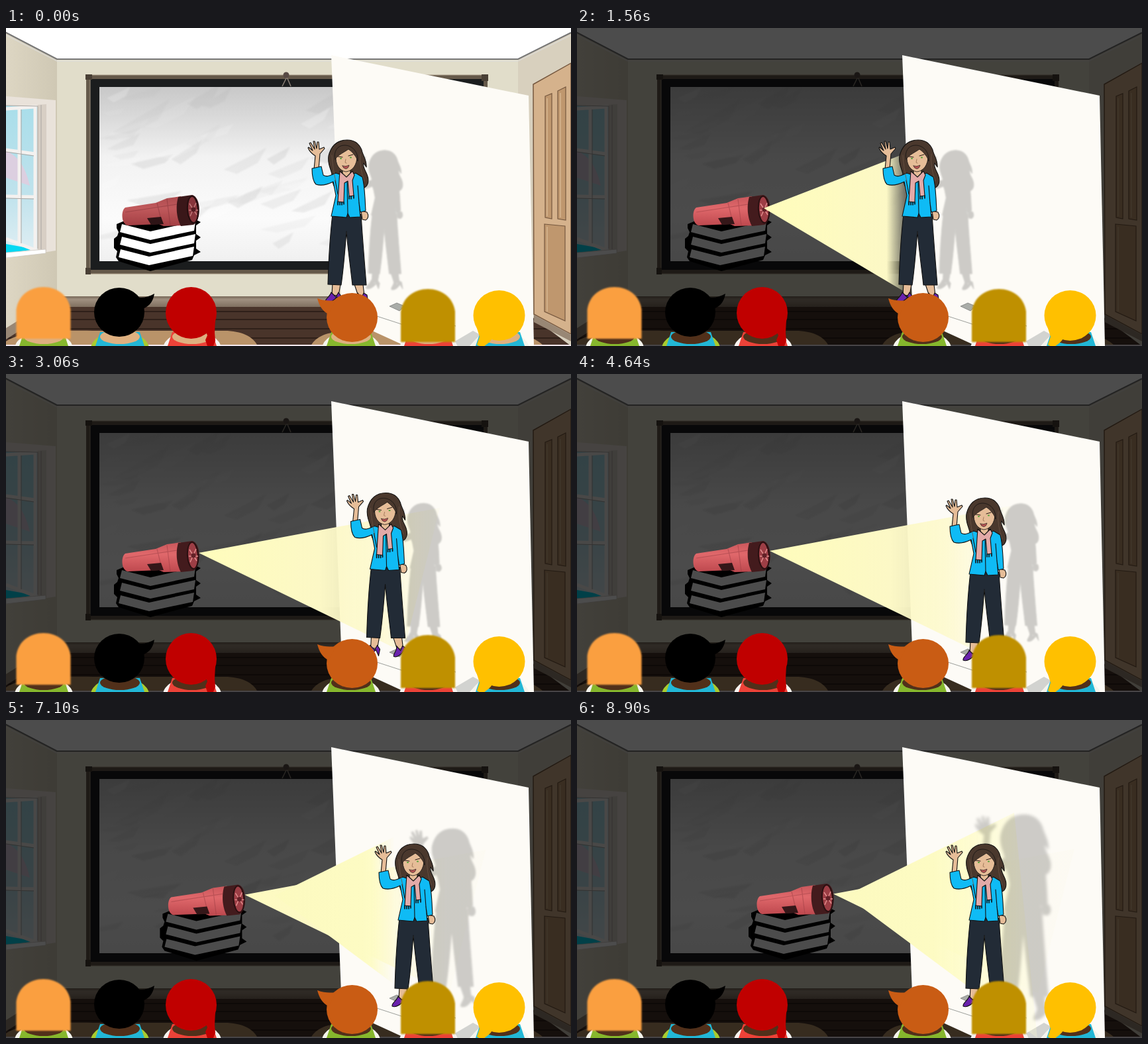
An HTML page for the animation above (9030 ms loop, 853 px wide and 480 px high).

```html
<!DOCTYPE html>
<html lang="en">
<head>
<meta charset="utf-8">
<title>Light and shadow</title>
<style>
  html, body { margin: 0; width: 100%; height: 100%; overflow: hidden; background: #fff; }
  svg { display: block; width: 100vw; height: 100vh; }
  .soft { filter: blur(1.3px); }
</style>
</head>
<body>
<svg viewBox="0 0 853 480" preserveAspectRatio="none">
  <defs>
    <linearGradient id="paper" x2="0" y2="1">
      <stop offset="0" stop-color="#c8c8c8"/><stop offset=".18" stop-color="#dadada"/>
      <stop offset=".4" stop-color="#f2f2f2"/><stop offset=".75" stop-color="#fbfbfb"/><stop offset="1" stop-color="#f0f0f0"/>
    </linearGradient>
    <linearGradient id="sky" x2="0" y2="1"><stop offset="0" stop-color="#a9deea"/><stop offset=".6" stop-color="#bfe2ec"/><stop offset="1" stop-color="#dfeef3"/></linearGradient>
    <linearGradient id="sideWall"><stop offset="0" stop-color="#ddd6c3"/><stop offset="1" stop-color="#cfc8b4"/></linearGradient>
    <linearGradient id="skirting" x2="0" y2="1"><stop offset="0" stop-color="#776858"/><stop offset=".3" stop-color="#a09080"/><stop offset="1" stop-color="#807060"/></linearGradient>
    <linearGradient id="torch" x2="0" y2="1">
      <stop offset="0" stop-color="#c9575b"/><stop offset=".4" stop-color="#e0686b"/><stop offset="1" stop-color="#bd484e"/>
    </linearGradient>
    <linearGradient id="narrowFill" gradientUnits="userSpaceOnUse" x1="282" x2="665">
      <stop offset="0" stop-color="#fffdbb"/><stop offset=".5" stop-color="#fcf8c6"/>
      <stop offset=".72" stop-color="#fdf9cb" stop-opacity=".85"/><stop offset="1" stop-color="#fffbd8" stop-opacity=".1"/>
    </linearGradient>
    <linearGradient id="wideFill" gradientUnits="userSpaceOnUse" x1="406" x2="700">
      <stop offset="0" stop-color="#fcfabf"/><stop offset=".45" stop-color="#fdfbc3"/>
      <stop offset=".68" stop-color="#fefcc8" stop-opacity=".75"/><stop offset="1" stop-color="#fffcd0" stop-opacity=".25"/>
    </linearGradient>
    <linearGradient id="narrowWipe" gradientUnits="userSpaceOnUse"><stop offset="0" stop-color="#fff"/><stop offset="1" stop-color="#000"/></linearGradient>
    <linearGradient id="wideWipe" gradientUnits="userSpaceOnUse"><stop offset="0" stop-color="#fff"/><stop offset="1" stop-color="#000"/></linearGradient>
    <mask id="narrowMask" maskUnits="userSpaceOnUse" x="0" y="0" width="853" height="480"><rect width="853" height="480" fill="url(#narrowWipe)"/></mask>
    <mask id="wideMask" maskUnits="userSpaceOnUse" x="0" y="0" width="853" height="480"><rect width="853" height="480" fill="url(#wideWipe)"/></mask>
    <clipPath id="paperClip"><path d="M141 89H705V352H141Z"/></clipPath>

    <path id="page" d="M175 296L218 307 286 292 284 306 218 320 172 308Z"/>

    <g id="woman" stroke="#111" stroke-width="1.1" stroke-linejoin="round" stroke-linecap="round">
      <path fill="#4a382d" d="M515 169C497 169 490 181 487 193C485 206 491 213 492 221C492 234 496 242 501 245L537 242C547 241 548 231 546 224C544 216 538 211 540 204L544 210C545 199 538 191 537 184C533 174 526 169 515 169Z"/>
      <path fill="#e6bd98" d="M465 213L467 193C462 190 458 186 456 181L457 180 463 185 458 174 460 173 466 183 464 171 466 171 469 182 470 172 472 172 473 183 480 180 481 182 474 190 472 213Z"/>
      <path fill="#e6bd98" d="M536 276L545 278C548 283 547 288 543 290L538 289Z"/>
      <path fill="#e6bd98" d="M493 385L492 403 502 404 505 387ZM526 387L532 405 541 404 539 387Z"/>
      <path fill="#6a22ad" d="M491 399C489 406 481 409 482 414C488 417 495 411 500 406L504 415 506 405 502 399 498 406ZM531 400C533 407 525 412 527 416C533 418 539 412 542 407L547 415 545 403 540 400 537 407Z"/>
      <path fill="#222b36" d="M493 281L536 281C538 315 541 350 544 388L523 388C520 360 516 333 514 307C512 333 510 360 506 388L486 387C487 350 489 315 493 281Z"/>
      <path fill="#0fbbf5" d="M498 219C490 222 485 226 479 222L476 209 462 212C462 222 463 231 468 236C477 239 486 236 494 232L498 253 491 284 514 286 516 280 519 286 535 285 533 264 535 278 543 276C542 260 542 240 538 225L528 219 513 224Z"/>
      <path fill="none" d="M515 231L516 280M531 238L533 264M497 230L501 251"/>
      <path fill="#e6bd98" d="M508 209H520V223L514 229 508 222Z"/>
      <path fill="#e3aaa8" d="M504 216L514 225 523 216 526 222 523 230 525 253 518 254 516 231 511 234 510 263 501 262 503 230Z"/>
      <path stroke-width="1.6" fill="none" d="M501 262V267M504 263V267M507 263V267M510 263V266M518 254V258M521 254V258M525 253V257"/>
      <path fill="#e6bd98" stroke-width=".8" d="M498 192C497 206 503 215 513 217C523 216 530 207 530 193C527 179 502 179 498 192Z"/>
      <path fill="#4a382d" stroke-width=".7" d="M497 198C494 187 500 177 511 177C523 177 532 187 531 201C529 194 523 187 517 183C510 188 502 191 497 198Z"/>
      <path fill="none" stroke="#211812" stroke-width="1" d="M501 194L508 195M517 193L524 191"/>
      <path fill="none" stroke="#52a438" stroke-width="2" d="M505 197H506M520 195.5H521"/>
      <path fill="none" stroke="#8a6045" stroke-width=".7" d="M513 198L512 203 514 204"/>
      <path fill="#b85555" stroke-width=".6" d="M508 208Q513 210 518 207Q517 212 513 212.5Q509 212 508 208Z"/>
      <path fill="none" stroke="#6b5344" stroke-width=".8" d="M492 192Q493 210 498 232M535 190Q533 210 541 231"/>
    </g>
  </defs>

  <!-- room -->
  <rect width="853" height="480" fill="#49342a"/>
  <path stroke="#2f2019" stroke-width="2" d="M60 428H800M40 440H820M20 454H840M0 468H853"/>
  <path fill="#e1ddca" d="M77 47H773V406H77Z"/>
  <path fill="url(#skirting)" d="M77 405H773V421H60Z"/>
  <path fill="url(#sideWall)" d="M0 7L77 47V405L0 455Z"/>
  <path fill="#988775" d="M77 405V421L0 470V453Z"/>
  <path fill="#d8d0be" d="M773 47L853 8V480L773 420Z"/>
  <path fill="#fff" d="M0 0H853V7L773 47H77L0 6Z"/>
  <path fill="none" stroke="#777" stroke-width="2" d="M0 7L77 47H773L853 7"/>
  <path fill="none" stroke="#ddd" stroke-width="1" d="M0 11L77 50H773L853 11"/>

  <!-- window -->
  <path fill="#e9e2da" d="M0 103L75 109V336L0 348Z"/>
  <path fill="#d8cfc5" d="M48 116L61 115V337L48 335Z"/>
  <path fill="url(#sky)" d="M0 117L47 119V335L0 338Z"/>
  <path fill="#dccfe0" d="M0 185C20 195 29 210 36 238L0 226Z"/>
  <path fill="#06d8f2" d="M0 326L44 334 0 340Z"/>
  <path fill="none" stroke="#f4f1ef" stroke-width="5" d="M0 122L44 119V335L0 318M20 121V325M0 184L44 190M0 254L44 255"/>
  <path fill="none" stroke="#aaa6a2" d="M0 117L48 118V333M53 116V334M23 123V325M0 187L42 193M0 257L42 258"/>
  <path fill="#fff" stroke="#c9c3bb" stroke-width=".7" d="M0 339L60 334V340L0 347Z"/>

  <!-- door -->
  <path fill="#d5b28c" stroke="#76583f" stroke-width="1.5" d="M796 85L853 53V462L797 432Z"/>
  <path fill="#bf976e" stroke="#76583f" stroke-width="1.2" d="M814 103L824 99V288L814 286ZM833 95L845 89V290L833 288ZM813 296L844 299V442L813 428Z"/>
  <path fill="none" stroke="#e2c5a2" d="M817 106V284M837 98V286M817 300V428"/>
  <path fill="#988775" d="M797 433L853 463V473L797 444Z"/>

  <!-- board -->
  <path fill="#1b1d1e" stroke="#65594a" stroke-width="6" d="M124 74H724V368H124Z"/>
  <path fill="none" stroke="#a29480" stroke-width="1" d="M121 71H727M121 371H727M127 77V365"/>
  <path fill="#493f35" d="M120 70H130V78H120ZM718 70H728V80H718ZM120 362H128V372H120Z"/>
  <path fill="url(#paper)" d="M141 89H705V352H141Z"/>
  <g id="creases" class="soft" clip-path="url(#paperClip)"></g>
  <path fill="none" stroke="#8b8177" stroke-width="1.5" d="M424 74L417 88M424 74L430 88"/>
  <circle cx="423" cy="71" r="4.5" fill="#574a45"/>

  <path fill="#b99369" d="M0 473C30 454 90 457 140 457H330C355 457 374 466 380 480H0ZM460 480C470 462 490 458 520 458H700C770 458 795 463 812 480Z"/>
  <rect y="478" width="853" height="2" fill="#f0e6ec"/>

  <g id="books">
    <path d="M167 296L186 288 288 290 294 293 287 298V311L294 316 287 321V333L294 338 284 343 281 350 218 367 170 352 166 346 168 337 163 332V318L168 314 170 308 167 302Z"/>
    <g fill="#fff"><use href="#page"/><use href="#page" y="19"/><use href="#page" y="38" x="-2"/></g>
  </g>
  <rect id="dark" width="853" height="480"/>

  <!-- screen -->
  <path fill="#fdfbf6" d="M491 41L789 102 797 480H603L507 436Z"/>
  <path fill="none" stroke="#9c9f9b" d="M560 435L600 448M670 446L679 450"/>
  <path fill="#a9aca8" stroke="#666" stroke-width=".6" d="M579 420L590 415 602 420 594 427Z"/>
  <path fill="#d2d3d0" d="M676 474L705 457 716 463 700 480H680Z"/>

  <g id="flashlight">
    <path fill="url(#torch)" d="M180 271L226 264 243 257 264 254 268 298 238 299 231 296 184 298C174 297 173 276 180 271Z"/>
    <path fill="none" stroke="#9f4046" stroke-width="1.2" d="M228 264L236 297M243 258L248 298M180 278L258 266" opacity=".55"/>
    <path fill="#351719" d="M213 287L234 285 238 296 219 297Z"/>
    <path fill="#431b1d" d="M260 255L281 252C295 255 295 291 283 297L264 299C257 286 256 268 260 255Z"/>
    <ellipse cx="282" cy="274" rx="8" ry="20" fill="#9d3e45" stroke="#2a1011" stroke-width="2" transform="rotate(-4 282 274)"/>
    <path stroke="#e49191" stroke-width="1.4" d="M277 265L288 282M278 284L287 264M276 275H290"/>
    <circle cx="283" cy="274" r="3.5" fill="#632127"/>
  </g>

  <g mask="url(#narrowMask)"><polygon id="narrow" fill="url(#narrowFill)"/></g>
  <g mask="url(#wideMask)"><path fill="url(#wideFill)" d="M406 265L660 140 695 480Z"/></g>
  <g id="shadow"><use href="#woman"/></g>
  <use id="teacher" href="#woman"/>
  <g id="pupils"></g>
</svg>

<script>
const el = id => document.getElementById(id);
const set = (id, attrs) => { for (const k in attrs) el(id).setAttribute(k, attrs[k]); };
const clamp = x => Math.min(1, Math.max(0, x));
const ramp = (t, from, to) => clamp((t - from) / (to - from));
const smooth = (t, from, to) => { const p = ramp(t, from, to); return p * p * (3 - 2 * p); };
const mix = (a, b, p) => a + (b - a) * p;

// Crumpled paper: seeded facets
let seed = 7;
const rnd = () => (seed = seed * 16807 % 2147483647) / 2147483647;
let facets = '';
for (let i = 0; i < 60; i++) {
  const x = 130 + rnd() * 400, y = 95 + rnd() * 240, w = 30 + rnd() * 60, slope = 0.15 + rnd() * 0.5;
  const tone = rnd() < 0.55 ? '#fff' : '#b0b0b0';
  facets += `<path fill="${tone}" opacity="${0.06 + rnd() * 0.18}" d="M${x} ${y}L${x + w} ${y - w * slope} ${x + w * 0.8} ${y + 6 - w * slope * 0.5} ${x + w * 0.3} ${y + 9 * rnd()}Z"/>`;
}
el('creases').innerHTML = facets;

// Pupils seen from behind: shirt, sleeves, neck, then hair
const shirt = (cx, color, sleeve) => `
  <ellipse cx="${cx}" cy="484" rx="44" ry="26" fill="${sleeve}"/>
  <path fill="${color}" d="M${cx - 37} 480L${cx - 30} 459H${cx + 30}L${cx + 37} 480Z"/>
  <ellipse class="neck" cx="${cx}" cy="466" rx="30" ry="11"/>`;
const dome = (cx, top, bottom, color) =>
  `<path class="soft" fill="${color}" d="M${cx - 41} ${bottom}V${top + 34}C${cx - 38} ${top + 12} ${cx - 20} ${top} ${cx} ${top}C${cx + 20} ${top} ${cx + 38} ${top + 12} ${cx + 41} ${top + 34}V${bottom}Z"/>`;
const head = (cx, cy, rx, ry, color, tail) =>
  `<g fill="${color}"><ellipse cx="${cx}" cy="${cy}" rx="${rx}" ry="${ry}"/>${tail}</g>`;
el('pupils').innerHTML =
  shirt(57, '#86b72d', '#f4f4ec') + dome(56.5, 391, 469, '#fa9f40') +
  shirt(172, '#22b7d6', '#a9cb2f') +
  head(171, 429, 38, 37, '#000', '<path d="M196 406C207 408 215 406 224 401C222 415 214 422 203 425Z"/>') +
  shirt(281, '#ec4238', '#f6f3f0') +
  head(279.5, 430, 38.5, 39, '#c00000', '<path d="M298 450L316 440 315 460 316 472 313 480H304L301 471 304 464Z"/>') +
  shirt(521, '#86b72d', '#f4f4ec') +
  head(522.5, 437, 38.5, 37, '#c95c14', '<path d="M470 408C480 412 489 412 498 411L487 432C477 427 473 419 470 408Z"/>') +
  shirt(638, '#ec4238', '#f6f3f0') + dome(637, 394, 474, '#bf9000') +
  shirt(746, '#22b7d6', '#f4f4ec') +
  head(744.5, 434, 39, 38, '#ffc000', '<path d="M709 447L735 464C734 474 726 476 719 483L711 478 715 466Z"/>');
const necks = document.querySelectorAll('.neck');

const wipe = (id, start, width, p) => {
  const soft = 36, edge = start + (width + soft) * p;
  set(id, { x1: edge - soft, x2: edge });
};

function draw(t) {
  const dark = ramp(t, 0, 960);
  set('dark', { opacity: 0.7 * dark });
  el('flashlight').style.filter = `brightness(${0.86 + 0.14 * dark})`;
  const skin = `rgb(${mix(222, 81, dark)},${mix(176, 48, dark)},${mix(128, 26, dark)})`;
  necks.forEach(neck => neck.setAttribute('fill', skin));

  // Teacher steps towards the screen
  const walk = smooth(t, 2230, 3730), dx = 101 * walk, dy = 18 * walk;
  set('teacher', { transform: `translate(${dx} ${dy})` });

  // Books and flashlight slide right
  const slide = smooth(t, 4650, 8400), sx = 96 * slide, sy = -5 * slide;
  set('books', { transform: `translate(${sx} ${sy})` });
  set('flashlight', { transform: `translate(${sx} ${sy})` });

  // The shadow grows as the light comes closer
  const settled = t >= 3900, grow = ramp(t, 4870, 8590);
  const scale = settled ? mix(0.84, 1.25, grow) : 0.85;
  const right = settled ? mix(697, 715, Math.sqrt(grow) * 0.3 + grow * 0.7) : 599 + dx;
  const top = settled ? mix(195, 142, grow) : 184 + dy;
  set('shadow', { transform: `translate(${right} ${top}) scale(${scale}) translate(-547 -168)` });
  el('shadow').style.filter = `brightness(0) blur(${mix(1, 1.8, grow)}px) opacity(.19)`;

  // Beam follows the flashlight; a wider beam joins it later
  const turn = smooth(t, 2230, 2950), lift = settled ? -3 : 0;
  const point = (x1, y1, x2, y2) => `${mix(x1, x2, turn) + sx},${mix(y1, y2, turn) + sy * 0.9 + lift}`;
  set('narrow', { points: [point(282, 272, 291, 270), point(556, 166, 655, 202), point(535, 422, 600, 420)].join(' ') });
  wipe('narrowWipe', 282, 274 + 110 * smooth(t, 1920, 2600) + sx, ramp(t, 960, 1800));
  wipe('wideWipe', 406, 300, ramp(t, 6400, 7700));
}

// Poses change every 60 ms, with one short rest before the slide
function pose(ms) {
  const base = ms < 4160 ? 0 : 4160;
  const stepped = base + Math.floor((ms - base) / 60) * 60;
  return base ? Math.min(stepped, 8900) : Math.min(stepped, 3960);
}
const began = performance.now();
function tick() {
  draw(pose((performance.now() - began) % 9030));
  requestAnimationFrame(tick);
}
tick();
</script>
</body>
</html>
```
